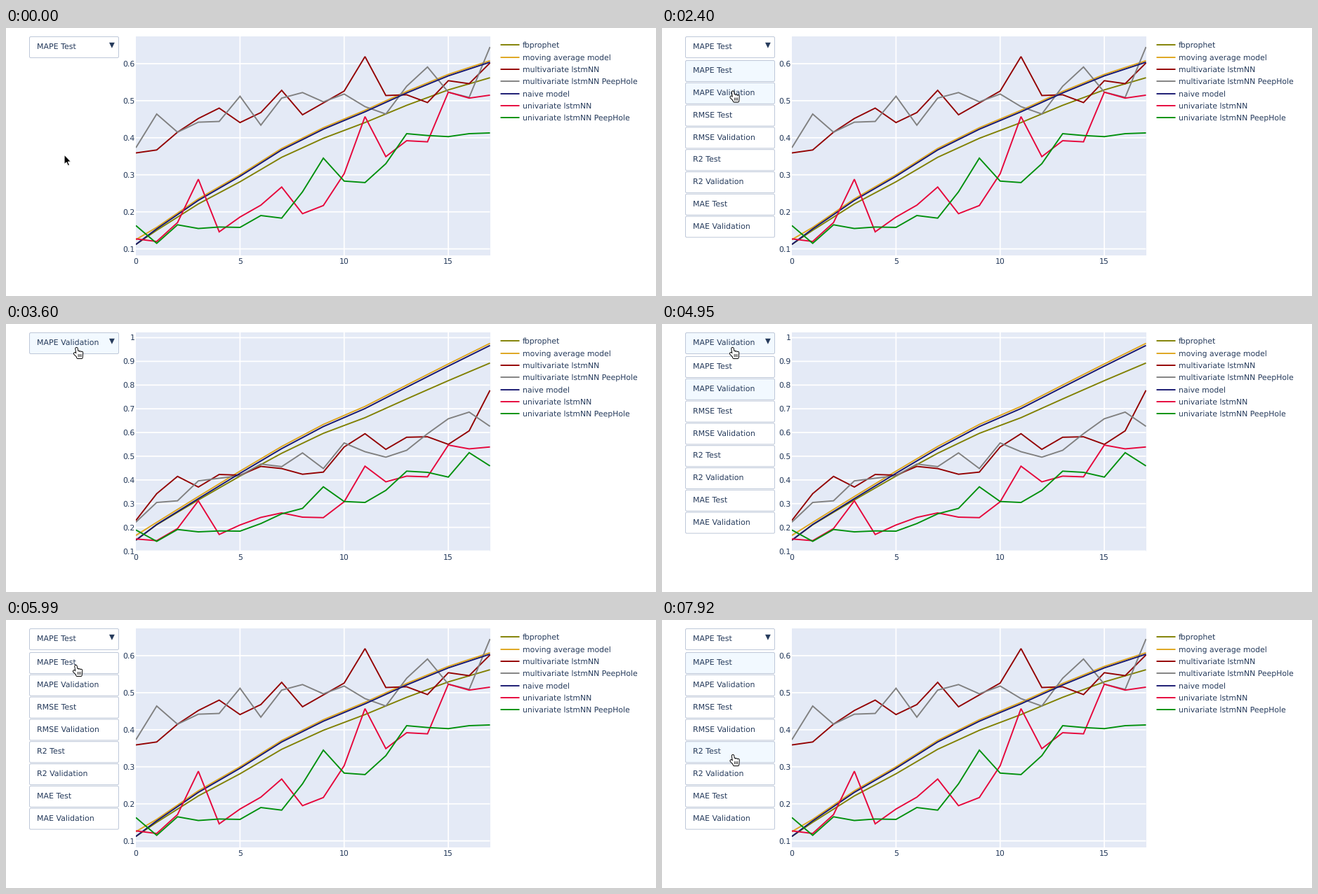
Write a matplotlib script that moves like this. It is 926 by 383 pixels and loops after 8000 ms.

```python
import numpy as np
import matplotlib.pyplot as plt
from matplotlib.animation import FuncAnimation
from matplotlib.patches import FancyBboxPatch, Polygon, Rectangle

W, H, DPI = 926, 383, 100
LOOP, STEP = 8000, 20
PT = 72 / DPI  # points per pixel
INK, EDGE, HOVER = "#263b5c", "#bec8d9", "#f2f9ff"
LEFT, TOP, RIGHT, BOTTOM = 185, 11.5, 689.5, 325
MODELS = {
    "fbprophet": "#808000",
    "moving average model": "#dea51c",
    "multivariate lstmNN": "#930000",
    "multivariate lstmNN PeepHole": "#808080",
    "naive model": "#17176f",
    "univariate lstmNN": "#e6053a",
    "univariate lstmNN PeepHole": "#00900c",
}
OPTIONS = [f"{m} {s}" for m in ("MAPE", "RMSE", "R2", "MAE")
           for s in ("Test", "Validation")]
DAYS = np.arange(18)
KNOTS = [0, *range(1, 18, 2)]


def baselines(knots, gap, power, lag, first):
    """Naive curve, the forecast falling behind it and the average just above."""
    naive = np.interp(DAYS, KNOTS, knots)
    forecast = naive - gap * (DAYS / 17) ** power
    average = naive + np.where(DAYS == 0, first, lag)
    return forecast, average, naive


def shifted(values, offset, bumps):
    return [v + offset + bumps.get(day, 0) for day, v in enumerate(values)]


forecast, average, naive = baselines(
    [.112, .154, .231, .296, .367, .423, .470, .521, .567, .604], .042, .85, .004, .013)
multi = [.359, .367, .415, .452, .480, .441, .468, .528, .462,
         .494, .526, .619, .514, .516, .495, .554, .546, .602]
multi_peep = [.373, .464, .415, .442, .444, .512, .434, .507, .522,
              .497, .518, .484, .464, .539, .591, .523, .509, .645]
uni = [.127, .120, .171, .288, .146, .186, .218, .267, .195,
       .217, .303, .457, .349, .392, .389, .523, .507, .515]
uni_peep = [.163, .115, .165, .155, .159, .158, .190, .183, .254,
            .345, .283, .279, .330, .411, .406, .403, .411, .413]
TEST = [forecast, average, multi, multi_peep, naive, uni, uni_peep]

forecast, average, naive = baselines(
    [.146, .212, .321, .428, .532, .625, .701, .791, .880, .967], .074, 1.5, .009, .020)
multi = [.229, .342, .415, .370, .423, .420, .457, .448, .424,
         .433, .539, .595, .529, .580, .582, .550, .607, .778]
multi_peep = [.222, .305, .312, .396, .407, .418, .467, .456, .514,
              .448, .556, .519, .496, .525, .595, .658, .686, .626]
VALIDATION = [forecast, average, multi, multi_peep, naive,
              shifted(uni, .024, {7: -.030, 8: .024, 10: -.019, 11: -.023, 12: .019}),
              shifted(uni_peep, .026, {7: .048, 15: -.017, 16: .078, 17: .020})]

# Pointer moves: start ms, end ms, x and y of the tip at the end
HOME = (83, 181)
MOVES = [
    (450, 1050, 106, 24), (2100, 2400, 101, 90), (3300, 3600, 100.5, 33.5),
    (5250, 5540, 99.5, 64.5), (6440, 6880, 101, 33.5), (7630, 7920, 101, 192.5),
]
TICK = 150  # the pointer moves in steps of this many ms
MENU_OPEN = [(1650, 3000), (4950, 6140), (7480, LOOP)]
PICKS = [(2850, 3000), (5990, 6140)]

plt.rcParams.update({"font.family": "DejaVu Sans", "text.hinting": "none"})
fig = plt.figure(figsize=(W / DPI, H / DPI), dpi=DPI, facecolor="white")
ax = fig.add_axes([0, 0, 1, 1])
ax.set_xlim(0, W)
ax.set_ylim(H, 0)
ax.axis("off")


def label(x, y, text, ha="left", size=10.85):
    return ax.text(x, y + 3.9, text, color=INK, fontsize=size * PT,
                   ha=ha, va="baseline", zorder=5)


def stroke(xs, ys, color, width, z, cap="butt", join="miter"):
    return ax.plot(xs, ys, color=color, lw=width * PT, zorder=z, snap=False,
                   solid_capstyle=cap, solid_joinstyle=join)[0]


def button(y, text):
    box = FancyBboxPatch((33.5, y), 127, 30, boxstyle="round,pad=0,rounding_size=1.8",
                         fc="white", ec=EDGE, lw=PT, zorder=4)
    ax.add_patch(box)
    return box, label(44, y + 13.6, text, size=10.95)


def day_x(day):
    return LEFT + (RIGHT - LEFT) * np.asarray(day) / 17


def chart(series, ticks, scale, one_y):
    """Draw grid, tick labels and lines; return them as one group."""
    group = []
    for v in ticks:
        y = one_y - scale * (v - 1)
        group.append(stroke([LEFT, RIGHT], [y, y], "white", 1.8, 2))
        group.append(label(184, y, f"{v:g}", "right"))
    for values, color in zip(series, MODELS.values()):
        line = stroke(day_x(DAYS), one_y - scale * (np.array(values) - 1), color, 1.9, 3)
        line.set_clip_path(plot_area)
        group.append(line)
    return group


plot_area = Rectangle((LEFT, TOP), RIGHT - LEFT, BOTTOM - TOP, fc="#e4eaf6", zorder=1)
ax.add_patch(plot_area)
for day in (0, 5, 10, 15):
    if day:
        stroke([day_x(day)] * 2, [TOP, BOTTOM], "white", 1.8, 2)
    label(day_x(day), 333, str(day), "center")
test_chart = chart(TEST, np.arange(1, 7) / 10, 529.4, -160.8)
validation_chart = chart(VALIDATION, np.arange(1, 11) / 10, 338.9, 19.5)

for i, (name, color) in enumerate(MODELS.items()):
    y = round(24.4 + 17.3 * i)
    stroke([704.5, 731.5], [y, y], color, 1.9, 3)
    label(736, y + .3, name)

header, header_text = button(12.5, OPTIONS[0])
ax.add_patch(Polygon([(147, 20.8), (154.8, 20.8), (150.9, 28.8)], fc=INK, lw=0, zorder=5))
items = [button(46.5 + 31.8 * i, text) for i, text in enumerate(OPTIONS)]

ARROW = np.array([(0, 0), (0, 14), (3.2, 11), (5.2, 16), (7.6, 15), (5.5, 10.2), (9.8, 10.2)])
arrow = ax.add_patch(Polygon(ARROW, fc="black", ec="white", lw=1.1 * PT, zorder=9))


def strands(segments):
    """Join segments into one path with breaks between them."""
    return np.array([p for a, b in segments for p in (a, b, (np.nan, np.nan))])


# The hand is a set of round-ended strokes: four fingers and a thumb
tops = [1.6] + [6.4 + .5 * i for i in range(3)]
fingers = [((2.5 * i, top), (1.9 + 1.7 * i, 14.4)) for i, top in enumerate(tops)]
HAND = strands(fingers + [((-2.4, 8.8), (2, 13))])
CREASES = strands([((x, 9.8), (x, 13.4)) for x in (2.6, 4.6, 6.6)])
hand = [(stroke([], [], color, width, z, "round", "round"), path)
        for path, color, width, z in ((HAND, "black", 4.4, 9),
                                      (HAND, "white", 2.5, 10),
                                      (CREASES, "black", .8, 11))]


def within(t, spans):
    return any(a <= t < b for a, b in spans)


def show(group, on):
    for artist in group:
        artist.set_visible(on)


def over(box, x, y):
    return 33 <= x <= 161 and box.get_y() <= y <= box.get_y() + 30


def pointer(t):
    pos = np.array(HOME, float)
    for start, end, *goal in MOVES:
        if t < start:
            break
        steps = round((end - start) / TICK) + 1
        u = 1 if t >= end else ((t - start) // TICK + 1) / steps
        pos += (goal - pos) * u * u * (3 - 2 * u)
    return pos


def draw(frame):
    t = frame * STEP + STEP - 1
    x, y = pointer(t)
    active = int(2850 <= t < 5990)
    opened = within(t, MENU_OPEN)
    picked = within(t, PICKS)

    show(test_chart, not active)
    show(validation_chart, bool(active))
    header_text.set_text(OPTIONS[active])
    pointing = over(header, x, y)
    header.set_facecolor(HOVER if pointing else "white")

    for i, (box, text) in enumerate(items):
        show((box, text), opened)
        hit = opened and over(box, x, y)
        pointing |= hit
        lit = (hit or i == active) and not picked
        box.set_facecolor(HOVER if lit else "white")

    arrow.set_visible(not pointing)
    arrow.set_xy(ARROW + (x, y))
    for line, path in hand:
        line.set_visible(pointing)
        line.set_data(*(path + (x, y)).T)
    return []


anim = FuncAnimation(fig, draw, frames=LOOP // STEP, interval=STEP,
                     repeat=True, repeat_delay=0, blit=False)
plt.show()
```
